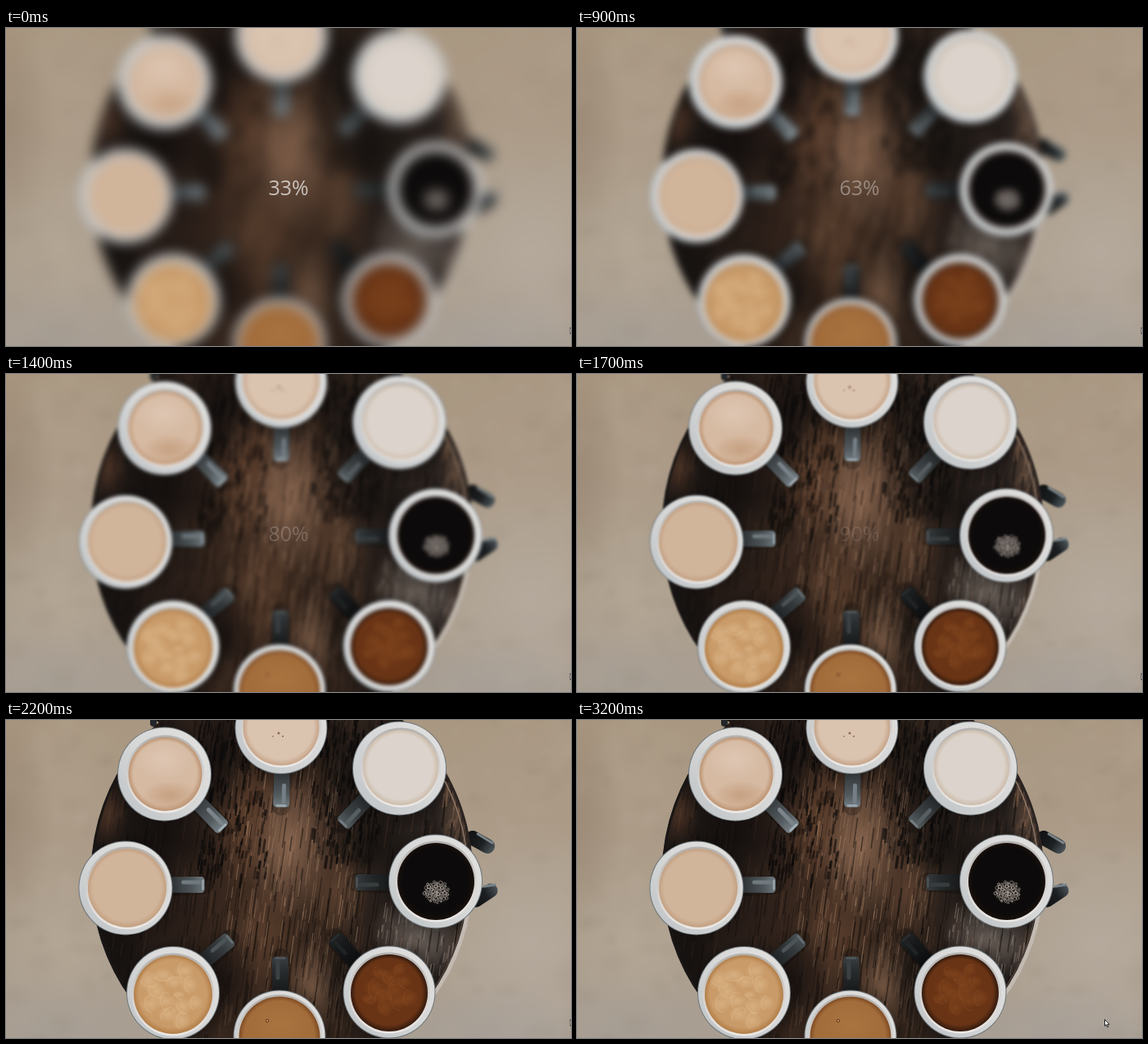
An HTML page with a canvas for the animation above (3700 ms loop, 690 by 388 pixels).

```html
<!DOCTYPE html>
<html lang="en">
<head>
<meta charset="utf-8">
<title>Blurry loading</title>
<style>
html, body { margin: 0; width: 100%; height: 100%; overflow: hidden; background: #a99b89; }
#stage { position: relative; width: 690px; height: 388px; overflow: hidden; }
#photo { position: absolute; left: -40px; top: -40px; }
#count { position: absolute; inset: 0; display: flex; align-items: center; justify-content: center;
  font: 25px "Open Sans", "Noto Sans", sans-serif; color: #fff; }
#mouse { position: absolute; left: 0; top: 0; }
</style>
</head>
<body>
<div id="stage">
  <canvas id="photo" width="770" height="468"></canvas>
  <div id="count"></div>
  <svg id="mouse" width="8" height="11" viewBox="0 0 8 11">
    <path d="M.5 .5V8.2L2.2 6.7 3.5 9.8 4.8 9.2 3.6 6.3H6Z" fill="#fff" stroke="#111" stroke-width=".9"/>
  </svg>
</div>
<script>
const PAD = 40, LOOP = 3700, MAX_BLUR = 11;
const photo = document.getElementById('photo');
const count = document.getElementById('count');
const mouse = document.getElementById('mouse');
const c = photo.getContext('2d');
const TABLE = { x: 337, y: 190, rx: 233, ry: 245 };

// Rim x, y, r; drink x, y, r; drink colours at the middle and the edge
const CUPS = [
  [193.5, 66, 57.5, 194.5, 66, 45, '#d6baa2', '#bd9371'],
  [336, 9.5, 56.5, 336, 9, 46.5, '#dac3af', '#c6a488'],
  [480.5, 59, 57.5, 482, 58, 46, '#dcd4cc', '#cdbcab'],
  [524.5, 197, 57.5, 525, 197, 47, '#0c0a0a', '#18100c'],
  [146, 205, 57.5, 148, 205, 48, '#d1b59b', '#c3a081'],
  [204, 333, 57, 204, 335, 48, '#c99b69', '#b27e48'],
  [334, 386, 56.5, 334, 387, 49.5, '#a36d3b', '#804c24'],
  [468, 332, 56.5, 468, 333, 47, '#693415', '#32190d']
];

let seed = 7;
function rnd(a = 0, b = 1) {
  seed = (seed * 16807) % 2147483647;
  return a + (b - a) * seed / 2147483647;
}

function disc(x, y, r, fill) {
  c.fillStyle = fill;
  c.beginPath();
  c.arc(x, y, r, 0, 7);
  c.fill();
}

// Soft elliptical patch of colour, rgb given as "r,g,b"
function glow(x, y, rx, ry, rgb, a) {
  c.save();
  c.translate(x, y);
  c.scale(rx, ry);
  const g = c.createRadialGradient(0, 0, 0, 0, 0, 1);
  g.addColorStop(0, `rgba(${rgb},${a})`);
  g.addColorStop(.5, `rgba(${rgb},${a * .55})`);
  g.addColorStop(1, `rgba(${rgb},0)`);
  disc(0, 0, 1, g);
  c.restore();
}

function ramp(x0, y0, x1, y1, ...cols) {
  const g = c.createLinearGradient(x0, y0, x1, y1);
  cols.forEach((col, i) => g.addColorStop(i / (cols.length - 1), col));
  return g;
}

function line(x0, y0, x1, y1, w, col, cap = 'round') {
  c.strokeStyle = col;
  c.lineWidth = w;
  c.lineCap = cap;
  c.beginPath();
  c.moveTo(x0, y0);
  c.lineTo(x1, y1);
  c.stroke();
}

function tableArc(inset, from, to, w, col) {
  c.strokeStyle = col;
  c.lineWidth = w;
  c.beginPath();
  c.ellipse(TABLE.x, TABLE.y, TABLE.rx - inset, TABLE.ry - inset, 0, from, to);
  c.stroke();
}

function floor() {
  c.fillStyle = ramp(0, -40, 0, 428, '#a8967f', '#ab9a86', '#ada08f', '#a79d92');
  c.fillRect(-PAD, -PAD, 770, 468);
  glow(0, 120, 60, 150, '138,120,101', .45);
  glow(70, 270, 70, 100, '184,170,153', .45);
  glow(70, 60, 60, 90, '180,163,144', .35);
  glow(60, 380, 120, 70, '165,158,150', .5);
  glow(640, 270, 120, 150, '184,174,163', .65);
  glow(640, 60, 100, 110, '172,155,136', .5);
  glow(600, 390, 140, 60, '165,160,156', .6);
  for (let i = 0; i < 170; i++) {
    const x = i % 2 ? rnd(-30, 130) : rnd(540, 720);
    const r = rnd(8, 26);
    glow(x, rnd(-30, 420), r, r * rnd(.5, 1.3), i % 3 ? '190,177,161' : '130,116,100', .09);
  }
}

// Thin streaks leaning slightly to the left on their way down
function grain(n, rgb, x0, x1, y0, y1, len, w, a) {
  for (let i = 0; i < n; i++) {
    const x = rnd(x0, x1), y = rnd(y0, y1), l = rnd(len * .3, len);
    line(x, y, x - l * .14, y + l, rnd(w * .4, w), `rgba(${rgb},${rnd(a * .3, a)})`);
  }
}

function tableTop() {
  c.save();
  c.beginPath();
  c.ellipse(TABLE.x, TABLE.y, TABLE.rx, TABLE.ry, 0, 0, 7);
  c.clip();
  c.fillStyle = ramp(106, 0, 570, 0, '#1b1715', '#231a16', '#3f2c21', '#35261d', '#241d1a', '#2c2522');
  c.fillRect(90, -60, 500, 500);

  glow(345, 150, 55, 95, '160,120,94', .75);
  glow(290, 120, 40, 90, '108,72,50', .6);
  glow(405, 210, 40, 60, '122,86,62', .55);
  glow(318, 260, 45, 65, '104,72,51', .6);
  glow(375, 325, 40, 60, '140,106,82', .65);
  glow(505, 262, 60, 55, '142,130,121', .65);
  glow(125, 115, 25, 45, '110,70,48', .5);
  glow(550, 115, 25, 50, '120,92,73', .5);
  glow(170, 245, 60, 40, '62,42,30', .4);

  grain(700, '12,9,8', 100, 600, -50, 400, 50, 2.2, .6);
  grain(350, '92,62,44', 120, 590, -50, 400, 45, 1.6, .5);
  grain(260, '176,138,108', 270, 430, 20, 350, 34, 1.4, .55);
  grain(90, '165,150,138', 455, 570, 215, 300, 26, 1.6, .5);
  grain(60, '150,112,86', 535, 575, 70, 160, 22, 2, .5);
  grain(220, '9,8,8', 235, 320, -10, 190, 16, 3.4, .8);
  grain(220, '9,8,8', 375, 460, -10, 170, 16, 3.4, .8);

  glow(265, 40, 38, 85, '10,9,10', .75);
  glow(410, 60, 32, 85, '12,11,11', .65);
  glow(445, 150, 50, 45, '12,11,10', .6);
  glow(190, 145, 80, 40, '12,10,10', .65);
  glow(265, 315, 45, 65, '12,10,10', .65);
  glow(405, 310, 28, 60, '14,11,10', .65);
  glow(140, 285, 35, 55, '12,10,10', .5);
  for (const [x, y, r] of CUPS) glow(x + 2, y + 5, r + 16, r + 15, '5,5,5', .9);
  c.restore();

  tableArc(1, 2.4, 3.75, 3, '#191615');
  tableArc(1, -.6, .1, 3, '#2b2421');
  tableArc(6, -.55, -.15, 1.5, '#8b7666');
  tableArc(2, .1, .74, 5, '#c3bab1');
  tableArc(6, .1, .74, 1.5, '#4c4039');
}

function stray() {
  line(570, 144, 588, 154, 18, ramp(570, 140, 596, 158, '#121415', '#1d2022', '#4d565b'));
  line(576, 139, 594, 150, 3, '#7a8489');
  line(574, 220, 592, 208, 17, ramp(574, 222, 600, 204, '#121415', '#1d2022', '#4d565b'));
  line(584, 203, 597, 201, 3, '#7a8489');
  line(180, -8, 180, 4, 8, '#23262a');
  line(188, -2, 207, 1, 10, '#191818');
}

// Dark where it meets the cup, bright towards its rounded tip
function handle(x0, y0, x1, y1, light) {
  const d = Math.hypot(x1 - x0, y1 - y0), ux = (x1 - x0) / d, uy = (y1 - y0) / d;
  const tone = k => `rgb(${light * k * .92},${light * k},${light * k * 1.04})`;
  const along = (back, side) => [x1 - ux * back + uy * side, y1 - uy * back - ux * side];
  line(x0 + 2, y0 + 3, ...along(2, 0), 23, 'rgba(6,6,6,.25)');
  c.lineJoin = 'round';
  c.lineWidth = 9;
  c.strokeStyle = c.fillStyle = ramp(x0, y0, x1, y1, tone(.35), tone(.6), tone(.8), tone(1.15));
  c.beginPath();
  c.moveTo(...along(d, 5));
  c.lineTo(...along(5, 5.5));
  c.lineTo(...along(5, -5.5));
  c.lineTo(...along(d, -5));
  c.closePath();
  c.fill();
  c.stroke();
  line(...along(d * .55, 3), ...along(7, 3), 5, tone(1.15));
  line(...along(2.5, 5), ...along(2.5, -5), 3, tone(1.5));
}

function cup(x, y, r, cx, cy, cr, core, edge) {
  disc(x, y, r, '#6d7478');
  disc(x, y, r - 1, ramp(x - r, y + r, x + r, y - r, '#bcc1c4', '#d6d7d7', '#e2e1df'));
  disc(cx, cy, cr + 2.5, ramp(cx, cy - cr, cx, cy + cr, '#b4b2b0', '#d3d0cd', '#ebe8e5'));
  const g = c.createRadialGradient(cx - 2, cy - 6, cr * .3, cx, cy, cr);
  g.addColorStop(0, core);
  g.addColorStop(.8, core);
  g.addColorStop(1, edge);
  disc(cx, cy, cr, g);
}

// Soft milk patches with curled outlines inside a cup
function foam(x, y, r, n, rgb, a) {
  c.save();
  c.beginPath();
  c.arc(x, y, r, 0, 7);
  c.clip();
  for (let i = 0; i < n; i++) {
    const t = i * 2.4, d = r * .8 * Math.sqrt((i + .5) / n);
    const px = x + d * Math.cos(t), py = y + d * Math.sin(t), s = rnd(8, 15);
    glow(px, py, s, s * rnd(.6, 1), rgb, a);
    c.strokeStyle = `rgba(${rgb},${a * .6})`;
    c.lineWidth = 1.5;
    c.beginPath();
    c.ellipse(px, py, s * .8, s * .5, rnd(0, 3), 0, rnd(2, 4));
    c.stroke();
  }
  c.restore();
}

function bubbles() {
  glow(526, 210, 18, 16, '130,120,112', .45);
  c.lineWidth = .8;
  for (let i = 0; i < 55; i++) {
    const t = i * 2.4, d = 15 * Math.sqrt(i / 55);
    c.strokeStyle = i % 3 ? 'rgba(180,168,158,.7)' : 'rgba(225,216,208,.75)';
    c.beginPath();
    c.arc(526 + d * Math.cos(t) * 1.05, 210 + d * Math.sin(t) * .9, rnd(.8, 2.3), 0, 7);
    c.stroke();
  }
}

function paint() {
  c.translate(PAD, PAD);
  floor();
  stray();
  tableTop();

  handle(228, 94, 266, 133, 115);
  handle(337, 58, 336, 107, 110);
  handle(444, 92, 410, 128, 82);
  handle(475, 198, 426, 198, 52);
  handle(195, 201, 243, 201, 105);
  handle(237, 298, 275, 266, 72);
  handle(335, 336, 335, 288, 56);
  handle(430, 298, 400, 264, 30);

  CUPS.forEach(args => cup(...args));

  glow(192, 48, 36, 26, '228,210,196', .5);
  glow(200, 92, 34, 18, '188,144,108', .6);
  disc(333, 16, 1.5, '#8c6a52');
  disc(338, 20, 1, '#8c6a52');
  disc(326, 20, 1, '#a5856c');
  foam(204, 335, 44, 13, '228,194,152', .5);
  foam(468, 330, 36, 11, '156,88,40', .38);
  glow(334, 372, 36, 25, '180,126,74', .4);
  disc(319, 367, 2.2, '#6f4120');
  disc(319, 367, 1, '#d8a66d');
  bubbles();
}

function mix(t, t0, t1, a, b) {
  const k = Math.min(1, Math.max(0, (t - t0) / (t1 - t0)));
  return a + (b - a) * k;
}

function frame(now) {
  const t = Math.floor((now % LOOP) / 100) * 100;
  const load = Math.min(100, Math.round(33 + t / 30));
  const left = 1 - load / 100;
  photo.style.filter = left ? `blur(${MAX_BLUR * left}px)` : 'none';
  count.textContent = load + '%';
  count.style.opacity = left;
  const x = mix(t, 2400, 2800, 688.5, 680) + mix(t, 2900, 3200, 0, -36);
  mouse.style.transform = `translate(${x}px, 365px)`;
}

paint();
const start = performance.now();
function tick() {
  frame(performance.now() - start);
  requestAnimationFrame(tick);
}
tick();
</script>
</body>
</html>
```
